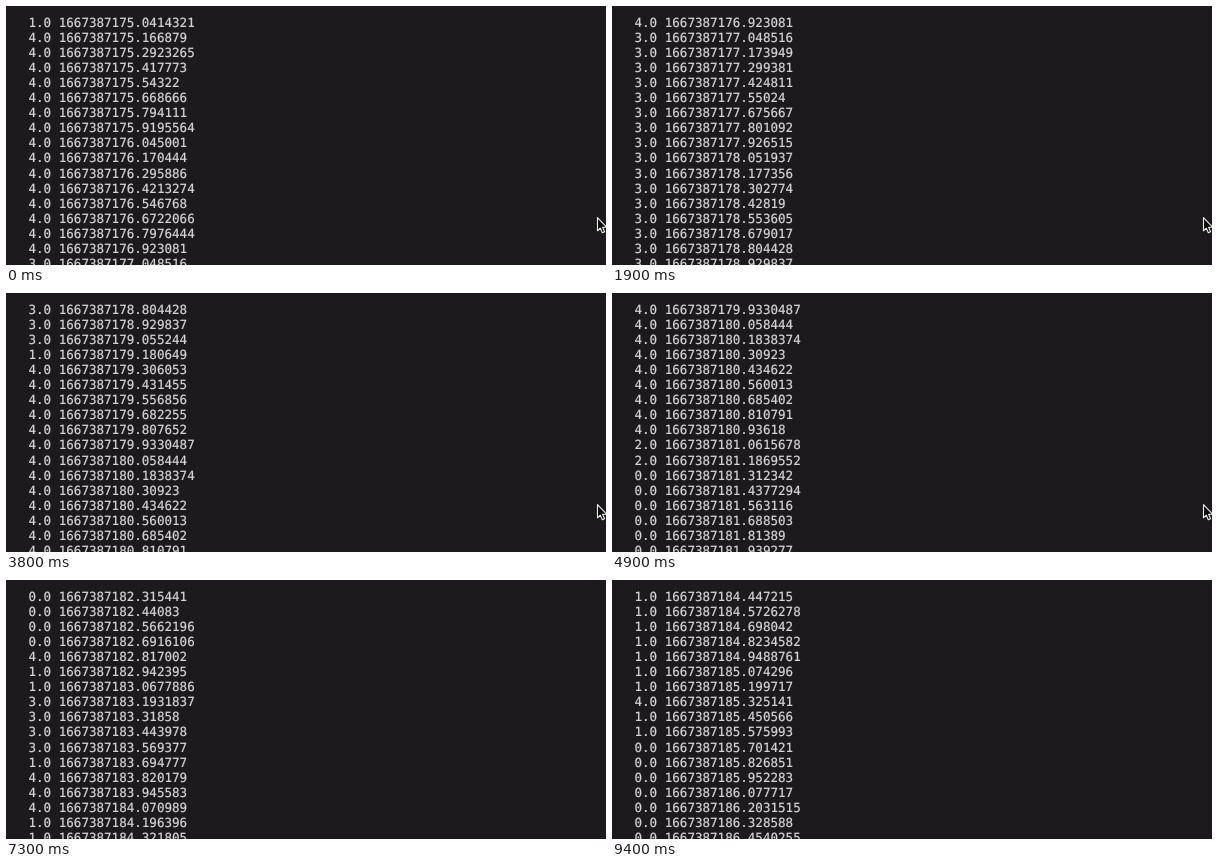
Animation, 600 px wide and 259 px high, one loop 9.6 s. Source, as an HTML page:

```html
<!DOCTYPE html>
<html lang="en">
<head>
<meta charset="utf-8">
<title>Timestamp log</title>
<style>
  html, body { margin: 0; width: 100%; height: 100%; overflow: hidden; background: #1c1a1c; }
  svg { display: block; width: 600px; height: 259px; }
  text {
    font: 12.55px "DejaVu Sans Mono", monospace;
    fill: #d6d5d6; stroke: #d6d5d6; stroke-width: 0.2;
    text-rendering: geometricPrecision;
  }
</style>
</head>
<body>
<svg viewBox="0 0 600 259">
  <g id="log"></g>
  <path id="pointer" d="M591.5 211.6V224.8L594.3 222.1L596.3 226.8L598.6 225.8L596.6 221.2H600.6Z"
        fill="#0c0b0c" stroke="#eee" stroke-width="1.1" stroke-linejoin="round"/>
</svg>
<script>
const LOOP = 9600, TICK = 100, POINTER_OFF = 7300;
const VISIBLE = 17, LEFT = 22.5, BASELINE = 21, PITCH = 15.055;
const FIRST_STAMP = 1667387175.0414321, INTERVAL = 0.125417;

// Logged levels as "value x rows"
const values = "1x1 4x15 3x17 1x1 4x14 2x2 0x12 4x1 1x2 3x4 1x1 4x3 1x9 4x1 1x2 0x7"
  .split(" ")
  .flatMap(run => {
    const [value, count] = run.split("x").map(Number);
    return Array(count).fill(value.toFixed(1));
  });

const random = seed => Math.abs(Math.sin(seed * 12.9898) * 43758.5453) % 1;

// Even sampling with a slow clock drift; some stamps print a seventh decimal
function stamp(i) {
  const drift = 0.0005 * Math.sin(i * 2 * Math.PI / 104);
  const digits = random(i) < 0.27 ? 7 : 6;
  return Number((FIRST_STAMP + i * INTERVAL + drift).toFixed(digits));
}

const rows = values.map((value, i) => `${value} ${stamp(i)}`);

const log = document.getElementById("log");
const pointer = document.getElementById("pointer");
const lines = Array.from({ length: VISIBLE }, (_, i) => {
  const line = document.createElementNS("http://www.w3.org/2000/svg", "text");
  line.setAttribute("x", LEFT);
  line.setAttribute("y", BASELINE + i * PITCH);
  return log.appendChild(line);
});

// One row per tick, pausing every fifth tick; two pauses come a tick early
function topRow(tick) {
  const early = (tick >= 16) + (tick >= 55);
  return tick - Math.floor((tick + 3 + early) / 5);
}

let shown = -1;
function draw(time) {
  const t = time % LOOP;
  const top = topRow(Math.floor(t / TICK));
  if (top !== shown) {
    lines.forEach((line, i) => { line.textContent = rows[top + i]; });
    shown = top;
  }
  pointer.style.display = t < POINTER_OFF ? "" : "none";
}

const start = performance.now();
function frame() {
  draw(performance.now() - start);
  requestAnimationFrame(frame);
}
frame();
</script>
</body>
</html>
```
